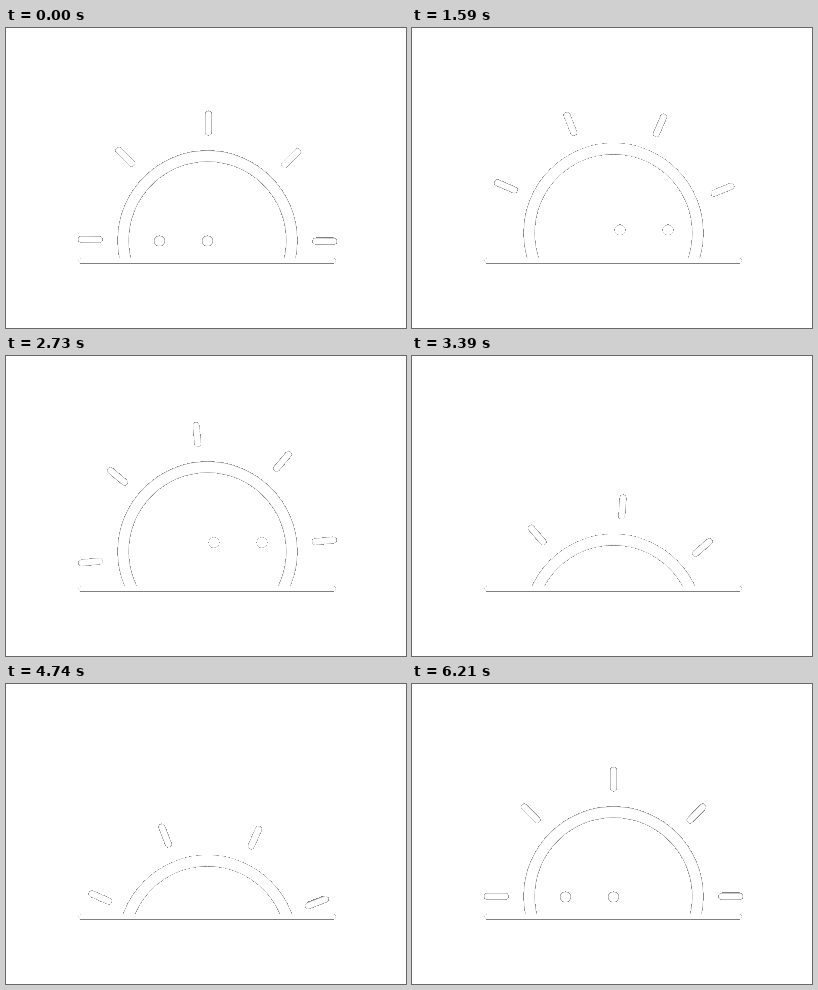
These frames come from a looping animation (400x300 px, 6.24 s). An HTML page without scripts:

```html
<!DOCTYPE html>
<html lang="en">
<head>
<meta charset="utf-8">
<title>Rising sun</title>
<style>
  html, body { margin: 0; width: 100%; height: 100%; overflow: hidden; background: #fff; }
  svg { display: block; width: 400px; height: 300px; }
  .ring { fill: none; stroke: #000; stroke-width: 11.7; }
  .sun, .rays, .eyes { animation: 6240ms linear infinite; }
  .sun { animation-name: rise; }
  .rays { animation-name: turn; }
  .eyes { animation-name: lift; }
  .look { animation: look 6240ms ease-in-out infinite; }

  /* slow climb, quick dive, slow climb, pop back up */
  @keyframes rise {
    0% { transform: translateY(212px) scale(1, 1); }
    11.06% { transform: translateY(210.5px) scale(1, 1); }
    20.2% { transform: translateY(207.4px) scale(1, 1); }
    25.48% { transform: translateY(204.5px) scale(1, 1); }
    30.29% { transform: translateY(200.8px) scale(1, 1); }
    40.38% { transform: translateY(195.6px) scale(1, 1); }
    45.67% { transform: translateY(194.7px) scale(1, 1); animation-timing-function: ease-in; }
    50.48% { transform: translateY(232px) scale(.9, 1.06); }
    52.9%, 54.33% { transform: translateY(267.5px) scale(1, 1); }
    60.6% { transform: translateY(266px) scale(1, 1); }
    75.96% { transform: translateY(260.5px) scale(1, 1); }
    80.77% { transform: translateY(257.2px) scale(1, 1); }
    90.87% { transform: translateY(255px) scale(1, 1); animation-timing-function: ease-in; }
    93.3% { transform: translateY(236px) scale(.95, 1.05); }
    95.35% { transform: translateY(222px) scale(1.167, .86); animation-timing-function: ease-out; }
    99.52%, 100% { transform: translateY(212px) scale(1, 1); }
  }
  @keyframes turn {
    from { transform: rotate(.43deg); }
    to { transform: rotate(90.43deg); }
  }
  @keyframes lift {
    0%, 11.06% { transform: translateY(0); }
    25.48% { transform: translateY(-3.5px); }
    43.75%, 54% { transform: translateY(-9.5px); }
    55%, 100% { transform: translateY(0); }
  }
  @keyframes look {
    0%, 14.5% { transform: translateX(0); }
    21%, 54% { transform: translateX(54.5px); }
    55%, 100% { transform: translateX(0); }
  }
</style>
</head>
<body>
<svg viewBox="0 0 400 300">
  <defs>
    <!-- keeps only the soft edge pixels that are at least half covered -->
    <filter id="edge" filterUnits="userSpaceOnUse" x="0" y="0" width="400" height="300">
      <feComponentTransfer>
        <feFuncA type="table" tableValues="0 0 0 0 0 0 0 0 0 0 .5 .45 .4 .35 .3 .25 .2 .15 .1 .05 0"/>
      </feComponentTransfer>
    </filter>
    <clipPath id="sky"><rect width="400" height="235"/></clipPath>
    <rect id="ray" x="-3.5" y="-129.8" width="7" height="25" rx="3.5"/>
    <g id="pair">
      <use href="#ray"/>
      <use href="#ray" transform="rotate(45)"/>
    </g>
  </defs>
  <g filter="url(#edge)">
    <g clip-path="url(#sky)">
      <g transform="translate(201.5 .4)">
        <g class="sun">
          <g class="rays">
            <use href="#pair"/>
            <use href="#pair" transform="rotate(90)"/>
            <use href="#pair" transform="rotate(180)"/>
            <use href="#pair" transform="rotate(270)"/>
          </g>
          <circle class="ring" r="84.3"/>
          <g class="eyes">
            <g class="look">
              <circle cx="-48" cy=".5" r="5.6"/>
              <circle cy=".5" r="5.6"/>
            </g>
          </g>
        </g>
      </g>
    </g>
    <rect x="72.5" y="230" width="257.5" height="5.6" rx="2.8"/>
  </g>
</svg>
</body>
</html>
```
